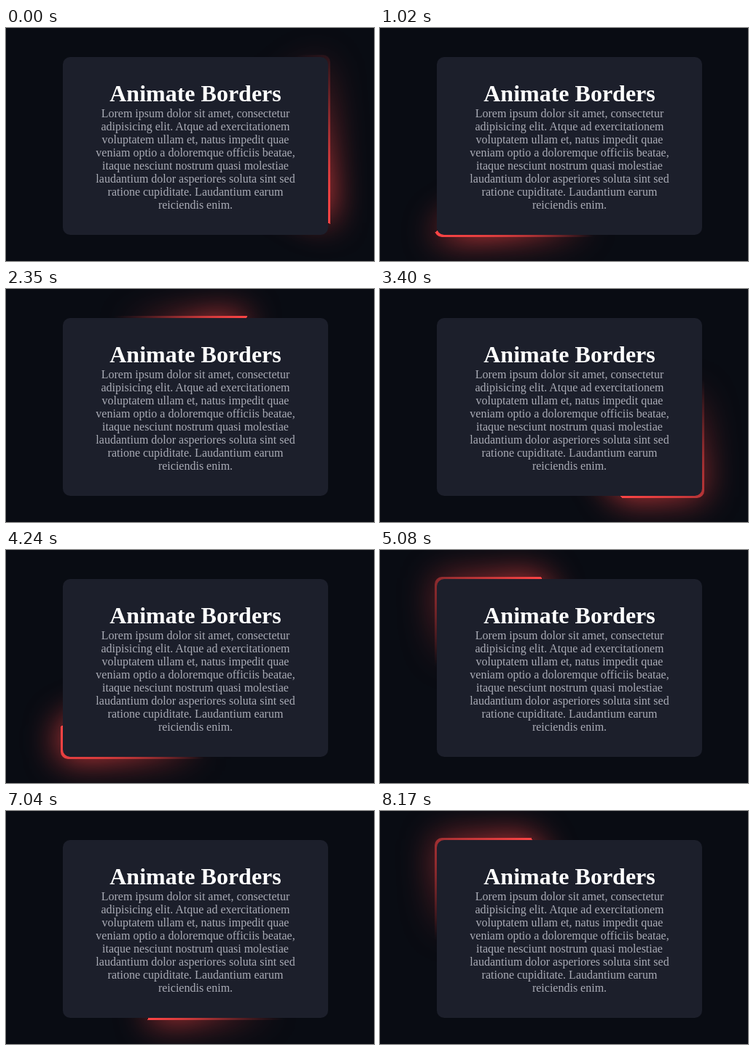
These frames come from a looping animation (505x321 px, 8.24 s). An HTML page:

```html
<!DOCTYPE html>
<html lang="en">
<head>
<meta charset="utf-8">
<title>Animate Borders</title>
<style>
  html, body {
    margin: 0;
    width: 100%;
    height: 100%;
    overflow: hidden;
    background: #090c13;
  }
  .stage {
    --angle: 120deg;
    position: relative;
    width: 505px;
    height: 321px;
    overflow: hidden;
    font-family: "Liberation Serif", "Times New Roman", serif;
  }
  .ring, .glow {
    position: absolute;
    left: 75px;
    top: 37px;
    width: 370px;
    height: 251px;
    border-radius: 10px;
    background: conic-gradient(from var(--angle), transparent 80%, #ff4545);
  }
  .glow { filter: blur(24px); }
  .card {
    position: absolute;
    left: 78px;
    top: 40px;
    width: 300px;
    padding: 32px;
    border-radius: 10px;
    background: #1c1f2b;
    text-align: center;
    white-space: nowrap;
  }
  h1 {
    margin: 0;
    font-size: 32px;
    line-height: 37px;
    color: #fff;
  }
  p {
    margin: 0;
    font-size: 16px;
    line-height: 18px;
    color: #a9abb5;
  }
</style>
</head>
<body>
<div class="stage">
  <div class="glow"></div>
  <div class="ring"></div>
  <div class="card">
    <h1>Animate Borders</h1>
    <p>Lorem ipsum dolor sit amet, consectetur<br>
      adipisicing elit. Atque ad exercitationem<br>
      voluptatem ullam et, natus impedit quae<br>
      veniam optio a doloremque officiis beatae,<br>
      itaque nesciunt nostrum quasi molestiae<br>
      laudantium dolor asperiores soluta sint sed<br>
      ratione cupiditate. Laudantium earum<br>
      reiciendis enim.</p>
  </div>
</div>
<script>
  const LOOP = 8240, STEP = 70;
  const START = 120.2, SPEED = 0.1147; // degrees, degrees per ms
  const stage = document.querySelector('.stage');
  const origin = performance.now();

  // The 70 ms beat restarts at these times.
  const beats = [7610, 880, 0];

  function hold(t) {
    const base = beats.find(b => t >= b);
    return base + Math.floor((t - base) / STEP) * STEP;
  }

  function draw() {
    const t = Math.max(0, performance.now() - origin) % LOOP;
    stage.style.setProperty('--angle', START + SPEED * hold(t) + 'deg');
    requestAnimationFrame(draw);
  }
  draw();
</script>
</body>
</html>
```
